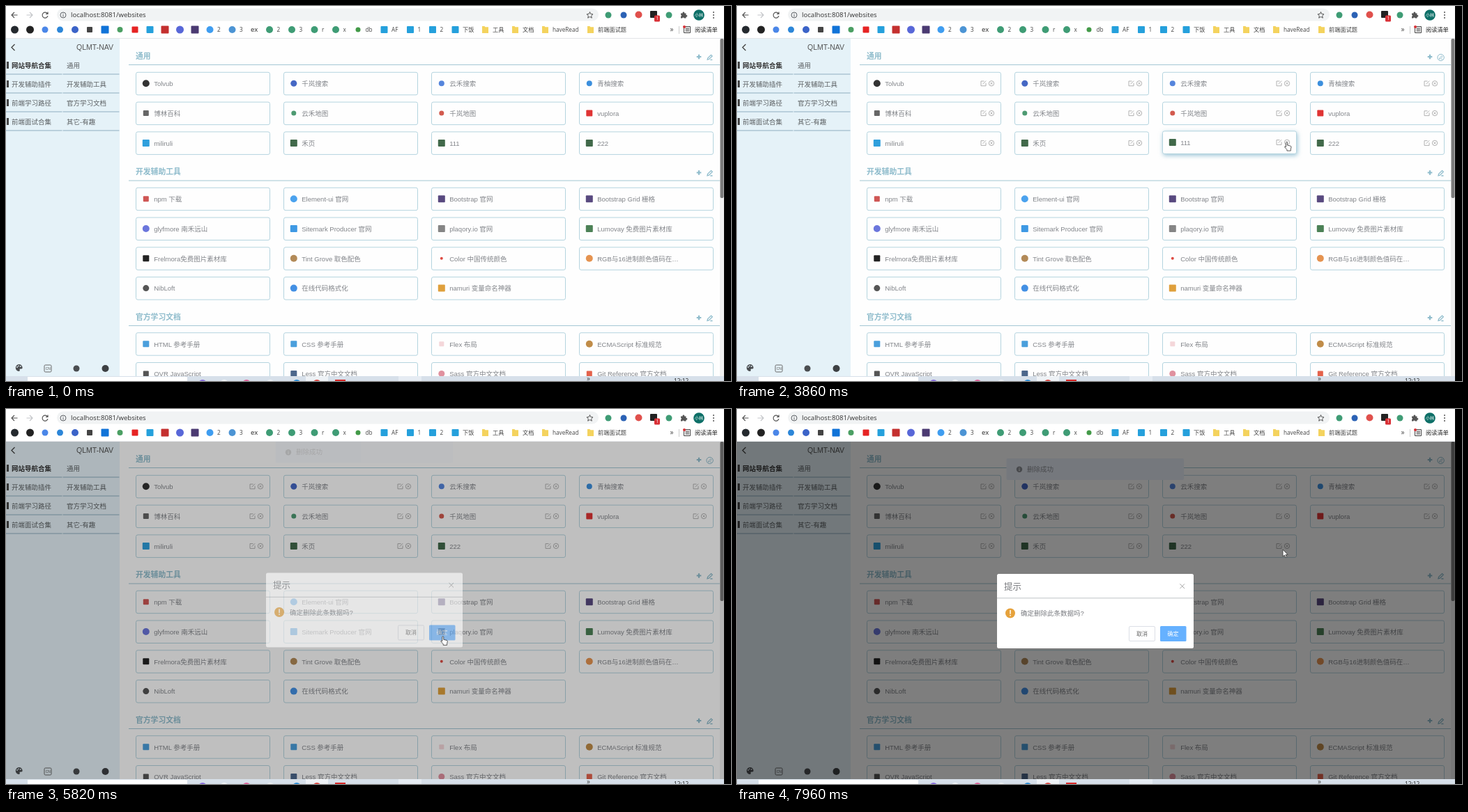
An HTML page that plays this animation: 1040 by 539 pixels, repeating every 8 s.

```html
<!DOCTYPE html>
<html lang="zh-CN">
<head>
<meta charset="utf-8">
<title>导航</title>
<style>
html, body { margin: 0; width: 100%; height: 100%; overflow: hidden; background: #fff; }
svg { display: block; width: 100%; height: 100%; }
text { font-family: "Liberation Sans", "Noto Sans CJK SC", "Noto Sans CJK", sans-serif; white-space: pre; }
.ui { font-family: "Open Sans", "Noto Sans CJK SC", "Noto Sans CJK", sans-serif; }
#page { clip-path: url(#viewport); }
</style>
</head>
<body>
<svg id="stage" viewBox="0 0 1040 539">
  <clipPath id="viewport"><rect y="47" width="1030" height="485"/></clipPath>
  <g id="chrome"></g>
  <g id="page">
    <g id="content"></g>
    <g id="cards"></g>
    <g id="message"></g>
    <rect id="overlay" y="47" width="1030" height="485"/>
    <g id="dialog"></g>
  </g>
  <g id="taskbar"></g>
  <g id="cursor">
    <circle id="halo" r="8" fill="#f3e54e" opacity=".8"/>
    <path id="hand" d="M-1 1a1 1 0 0 1 2 0V4.6l4.3 1q1.3.4 1.2 1.9L5.8 10.400V12.600H.4V11L-2.900 7.300q-.1-1.500 1.300-.8L-1 7z"/>
    <path id="arrow" d="M0 0V10L2.300 8 3.900 11.600 5.500 10.900 3.900 7.400H7.100Z"/>
  </g>
</svg>
<script>
const LOOP = 8000, EDIT_AT = 2400, DELETE_AT = 5750;
const COL = 212, CARD_W = 192, CARD_H = 32.5;
const $ = id => document.getElementById(id);
const add = (parent, ...parts) => parent.insertAdjacentHTML('beforeend', parts.join(''));

const text = (x, cy, s, size, fill, attrs = '') =>
  `<text x="${x}" y="${cy + size * .36}" font-size="${size}" fill="${fill}" ${attrs}>${s}</text>`;
const ui = (x, cy, s, size = 8.2, fill = '#444', attrs = '') => text(x, cy, s, size, fill, `class="ui" ${attrs}`);
const box = (x, y, w, h, fill, attrs = '') =>
  `<rect x="${x}" y="${y}" width="${w}" height="${h}" fill="${fill}" ${attrs}/>`;
const dot = (x, y, r, fill, attrs = '') => `<circle cx="${x}" cy="${y}" r="${r}" fill="${fill}" ${attrs}/>`;
const line = (x, y, d, color, width = 1, attrs = '') =>
  `<path transform="translate(${x} ${y})" d="${d}" fill="none" stroke="${color}" stroke-width="${width}" ${attrs}/>`;
// spec: shape letter, color and optional size, such as "c#333/7"
const mark = (x, y, spec) => {
  const [color, size = 10] = spec.slice(1).split('/');
  return spec[0] === 'c' ? dot(x, y, size / 2, color) : box(x - size / 2, y - size / 2, size, size, color, 'rx="1"');
};

function drawChrome() {
  add($('chrome'),
    box(0, 0, 1030, 47, '#fff'), box(0, 46, 1030, 1, '#e3e5e8'),
    box(73, 3.5, 777, 18, '#f1f3f4', 'rx="9"'),
    line(12, 13, 'M4.500 0H-4M0-4L-4 0L0 4', '#555', 1.2),
    line(34, 13, 'M-4.500 0H4M0-4L4 0L0 4', '#c4c6c9', 1.2),
    line(56, 13, 'M3.500-2A4 4 0 1 0 4 1.200M4-4.500V-1.500H1', '#555', 1.2),
    dot(82, 13, 4, 'none', 'stroke="#5f6368"'), line(82, 13, 'M0-2.300v1M0-.5v3', '#5f6368'),
    ui(93, 12.5, 'localhost:8081/websites', 9.65, '#333'),
    line(837.5, 13, 'M0-4.500L1.300-1.500 4.500-1.200 2.100 1 2.800 4.200 0 2.500-2.800 4.200-2.100 1-4.500-1.200-1.300-1.500Z', '#555'),
    mark(864, 13, 'c#3f9c75/9'), mark(886, 13, 'c#2b62b5/9'), mark(907.5, 12.5, 'c#e0504c'),
    mark(929, 12, 's#222'), box(930, 13.5, 8, 9, '#d93036', 'rx="1.5"'), ui(932.5, 18, '1', 6.5, '#fff'),
    mark(951, 13, 'c#3f9c75/9'),
    `<path transform="translate(972 13)" d="M-4-2.500H-1.500V-3a1.400 1.400 0 0 1 2.800 0V-2.500H3.500V0H4a1.300 1.300 0 0 1 0 2.700H3.500V4.500H.8a1.400 1.400 0 0 0-2.600 0H-4V2a1.300 1.300 0 0 0 0-2.500Z" fill="#555"/>`,
    dot(994, 13, 7.8, '#0d6f67'), ui(988, 12.8, '小林', 6, '#fff'),
    [9, 13, 17].map(y => dot(1015, y, 1, '#555')).join(''));

  const bookmarks = [
    [12.5, 'c#24292e/11'], [34.5, 'c#222/11'], [56, 'c#4a86e8/9'], [77.5, 'c#2c86d8/9'], [99, 'c#3b63c8'],
    [120, 's#444/8'], [142, 's#1073d8/11'], [163.5, 'c#4b9f63/8'], [185, 's#e62323/9'], [206.5, 's#25a0dc'],
    [228, 's#c4302f/11'], [249.5, 'c#5867d8/11'], [271, 's#4b3a72/11'], [292.5, 'c#3f9df0', '2'],
    [324.5, 'c#4c94d4', '3'], [378, 'c#3f9c75', '2'], [410, 'c#3f9c75', '3'], [442.5, 'c#3f9c75', 'r'],
    [473, 'c#3f9c75', 'x'], [505, 'c#439a48/7', 'db'], [542.5, 's#25a0dc', 'AF'], [580, 's#25a0dc', '1'],
    [612, 's#25a0dc', '2'], [644.5, 's#25a0dc', '下饭']];
  for (const [x, spec, label = ''] of bookmarks) add($('chrome'), mark(x, 34, spec), ui(x + 10.5, 34.5, label));
  const folders = [[687.5, '工具'], [730.5, '文档'], [773.5, 'haveRead'], [838.5, '前端面试题']];
  for (const [x, label] of folders)
    add($('chrome'), `<path transform="translate(${x} 34)" d="M-4.500-5H-1L0-3.800H4.500V5H-4.500Z" fill="#f4d35e"/>`,
      ui(x + 10.5, 34.5, label));
  add($('chrome'), ui(351, 34, 'ex', 9.5, '#222'), ui(952.5, 33.5, '»', 10),
    box(965, 29, 1, 11, '#ccc'), line(977, 34, 'M-4.500-4.500H4.500V4.500H-4.500ZM-2.500-2H3M-2.500 0H3M-2.500 2H3', '#444'),
    dot(973, 30, 2, '#d93036'), ui(988, 34.5, '阅读清单', 8.2, '#222'),
    box(1030, 0, 10, 539, '#000'));
}

const headerIcons = cy => line(994, cy + 1, 'M-3.300 0h6.600M0-3.300v6.600', '#8fbccc', 2.2);
const pencil = (x, y, scale, attrs = '') =>
  `<path transform="translate(${x} ${y}) scale(${scale})" d="M-3.500 3.500L-2.900 1.100 2-3.700 3.800-2-1.100 2.900ZM.8 3.700H4" fill="none" stroke="#8fbccc" stroke-width="1.300" ${attrs}/>`;

function drawContent() {
  const content = $('content');
  add(content, box(0, 47, 1030, 485, '#fefefe'), box(0, 47, 163, 485, '#e5f2f8'),
    line(10, 59.5, 'M2.500-4.500L-2 0L2.500 4.500', '#444', 1.3), text(101, 59.5, 'QLMT-NAV', 10.55, '#555'));
  const left = ['网站导航合集', '开发辅助插件', '前端学习路径', '前端面试合集'];
  const right = ['通用', '开发辅助工具', '官方学习文档', '其它-有趣'];
  left.forEach((label, i) => {
    const y = 85 + 27 * i;
    add(content, box(1, y - 5, 3, 10, '#444'),
      text(8, y + .5, label, 9.5, i ? '#5c6063' : '#333', i ? '' : 'font-weight="600"'),
      text(87, y + .5, right[i], 9.5, '#5c6063'),
      box(0, y + 12.5, 80.5, 1, '#8fb0c2'), box(81.5, y + 12.5, 81, 1, '#8fb0c2'));
  });
  add(content,
    `<path transform="translate(18.500 520)" d="M0-5A5 5 0 1 0 .5 5Q2 4 1 2.500 1 1.500 2.500 1.500H4Q5.500 1 5-1 4-5 0-5Z" fill="#4a4d50"/>`,
    dot(16, 519, .9, '#e5f2f8'), dot(18, 517.3, .9, '#e5f2f8'), dot(20.8, 518, .9, '#e5f2f8'),
    box(55, 516, 10, 10, 'none', 'rx="1.500" stroke="#666"'), text(56.7, 521, 'CN', 4.8, '#555'),
    mark(101, 521, 'c#4a4d50/9'), mark(142.5, 521, 'c#3d4043'),
    box(1024, 47, 6, 485, '#efefef'), box(1024.5, 47, 5, 229, '#7b7b7b', 'rx="2"'));

  [['通用', 72], ['开发辅助工具', 238.5], ['官方学习文档', 447]].forEach(([title, cy], i) => {
    add(content, text(186, cy, title, 10.8, '#8fbccc', 'font-weight="bold"'), headerIcons(cy),
      box(176, cy + 12, 848, 1, '#a3c7d4'), pencil(1009.5, cy + 1.8, i ? 1 : .95, i ? '' : 'id="pen"'));
  });
  add(content, `<g id="penActive">${dot(1009.6, 74, 4.7, 'none', 'stroke="#8fbccc"')}${pencil(1009.6, 74, .65)}</g>`);
}

const sections = [
  [95.3, [['Tolvub', 'c#333'], ['千岚搜索', 'c#4567c4/9'], ['云禾搜索', 'c#5585dc/8'], ['青柚搜索', 'c#3c8fdd/8'],
    ['博林百科', 's#666/8'], ['云禾地图', 'c#4d9a72/7'], ['千岚地图', 'c#d25a4e/7'], ['vuplora', 's#e03434/9'],
    ['miliruli', 's#2f9fdc'], ['禾页', 's#41694a'], ['111', 's#41694a'], ['222', 's#41694a']]],
  [261.2, [['npm 下载', 's#cf5654/8'], ['Element-ui 官网', 'c#4ba2ee'], ['Bootstrap 官网', 's#58497f'],
    ['Bootstrap Grid 栅格', 's#58497f'], ['glyfmore 南禾远山', 'c#6b76dc'], ['Sitemark Producer 官网', 's#3e99e4'],
    ['plaqory.io 官网', 's#858585'], ['Lumovay 免费图片素材库', 's#4c8156'], ['Frelmora免费图片素材库', 's#222/9'],
    ['Tint Grove 取色配色', 'c#b28a58'], ['Color 中国传统颜色', 'c#de4b43/4'], ['RGB与16进制颜色值码在…', 'c#e59350'],
    ['NibLoft', 'c#555/9'], ['在线代码格式化', 'c#4390e4'], ['namuri 变量命名神器', 's#dfa03c']]],
  [469.7, [['HTML 参考手册', 's#4a9fdc/9'], ['CSS 参考手册', 's#4a9fdc/9'], ['Flex 布局', 's#f4d7da/7'],
    ['ECMAScript 标准规范', 'c#c08c48'], ['QVR JavaScript', 's#555/8'], ['Less 官方中文文档', 's#4c678c/9'],
    ['Sass 官方中文文档', 'c#e0919f/9'], ['Git Reference 官方文档', 's#e4624b/8']]]
];
const cards = [];

function drawCards() {
  for (const [top, items] of sections) items.forEach(([label, spec], i) => {
    const x = 186.5 + COL * (i % 4), y = top + 42.8 * Math.floor(i / 4), cy = y + 16;
    const editable = top === 95.3;
    const actions = editable ? `<g class="actions">${
      line(x + 167, cy, 'M1-3.300H-3.500V3.500H3.500V-.5M-1 1L3.700-3.700', '#aaa', .9)}${
      line(x + 178.5, cy, 'M-3.700 0a3.700 3.700 0 1 0 7.400 0a3.700 3.700 0 1 0-7.400 0M-1.500-1.500l3 3M1.500-1.500l-3 3', '#aaa', .9)}</g>` : '';
    add($('cards'), `<g>${box(x, y, CARD_W, CARD_H, '#fefefe', 'rx="2.500" stroke="#b4d4df"')}${
      mark(x + 14.3, cy, spec)}${text(x + 25.7, cy + .4, label, 9.5, '#82858a')}${actions}</g>`);
    cards.push({ x, y, label, node: $('cards').lastElementChild });
  });
}

function drawPopups() {
  add($('message'), box(386.5, 71, 254.5, 31, '#ebf1fb', 'rx="2"'),
    dot(405, 86.8, 4.2, '#909399'), line(405, 86.8, 'M0-2.300v1.200M0-.3v2.600', '#fff'),
    text(416, 86.5, '删除成功', 9.5, '#909399'));
  add($('dialog'), box(373, 237, 282, 107, '#fff', 'rx="2.500"'),
    text(383, 255.5, '提示', 12.5, '#77797d', 'font-weight="500"'),
    line(638.7, 254.7, 'M-3.300-3.300l6.600 6.600M3.300-3.300l-6.600 6.600', '#999', .9),
    box(373, 271.3, 282, 1, '#bfc3c6'),
    dot(392, 293.5, 7, '#e6a23c'), box(391.3, 289, 1.5, 5.7, '#fff'), box(391.3, 296, 1.5, 1.6, '#fff'),
    text(407, 293.7, '确定删除此条数据吗?', 9.5, '#7b7d82'),
    box(562.5, 312.5, 37, 21, '#fff', 'rx="1.500" stroke="#dcdfe6"'), text(573, 323, '取消', 8, '#666'),
    box(607, 312, 37.5, 22, '#66b1ff', 'rx="1.500"'), text(617.5, 323, '确定', 8, '#fff', 'font-weight="500"'));
}

function drawTaskbar() {
  add($('taskbar'), box(0, 532, 1030, 7, '#d7e0ea'), box(31, 533, 229, 6, '#fff'), box(563, 532, 33, 7, '#e6ecf3'),
    box(430, 532, 32, 7, '#eef2f6'),
    [[282, '#8a6fe0'], [313, '#f4f7fa'], [345, '#e0639c'], [379, '#eef1f4'], [417, '#2b8fd8'], [446, '#dd4b45']]
      .map(([x, c]) => dot(x, 543, 6, c)).join(''),
    box(472, 537, 15, 2, '#d92b2b'), ui(833, 535, '»', 10, '#444'), ui(958, 539, '12:12', 8.3, '#222'));
}

const path = [
  [260, 1013, 530], [460, 1016, 420], [760, 1000, 230], [1060, 985, 116], [1130, 985, 116], [1740, 1005.5, 75],
  [2600, 1005.5, 75], [2900, 950, 150], [3200, 860, 196], [3390, 811, 201], [3450, 806, 200], [3860, 788.5, 195.5],
  [4940, 788.5, 195.5], [5340, 629, 325], [5550, 626.5, 327], [5820, 626.5, 327], [6310, 767.5, 223.5],
  [6440, 762, 200], [6700, 794, 197], [6900, 794, 197], [6970, 788.5, 195.5], [7700, 788.5, 195.5], [7960, 783, 202]
];
const ramp = (t, from, to) => Math.min(1, Math.max(0, (t - from) / (to - from)));
const modal = t => ramp(t, 4610, 4800) - ramp(t, 5750, 5890) + ramp(t, 7700, 7900);
const clicks = [[2330, 2460], [4540, 4680], [5690, 5760], [7630, 7760]];

function pointer(t) {
  const i = path.findIndex(key => key[0] > t);
  if (i < 0) return path[path.length - 1].slice(1);
  if (i === 0) return path[0].slice(1);
  const [t0, x0, y0] = path[i - 1], [t1, x1, y1] = path[i], k = (t - t0) / (t1 - t0);
  return [x0 + (x1 - x0) * k, y0 + (y1 - y0) * k];
}
const inside = ([px, py], x, y, w, h) => px >= x && px <= x + w && py >= y && py <= y + h;
const shiftOf = (card, t) => card.label === '222' && t >= DELETE_AT ? -COL : 0;
const hit = (card, t) => t >= 260 && modal(t) === 0 && !(card.label === '111' && t >= DELETE_AT) &&
  inside(pointer(t), card.x + shiftOf(card, t), card.y, CARD_W, CARD_H);

// Share of the last 160 ms spent over the card: a stateless hover transition.
function hoverAmount(card, t) {
  let hits = 0;
  for (let k = 0; k < 8; k++) hits += hit(card, t - k * 20);
  return hits / 8;
}

function render(t) {
  const editing = t >= EDIT_AT;
  for (const card of cards) {
    const h = hoverAmount(card, t);
    card.node.style.display = card.label === '111' && t >= DELETE_AT ? 'none' : '';
    card.node.setAttribute('transform', `translate(${shiftOf(card, t)} ${-h})`);
    card.node.style.filter = h ? `drop-shadow(1px 2px 3px rgba(90,160,190,${.6 * h}))` : '';
  }
  document.querySelectorAll('.actions').forEach(g => g.style.display = editing ? '' : 'none');
  $('pen').style.display = editing ? 'none' : '';
  $('penActive').style.display = editing ? '' : 'none';

  const m = modal(t), slide = ramp(t, 5750, 6090);
  $('overlay').setAttribute('opacity', m / 2);
  $('dialog').setAttribute('opacity', m ** .7);
  $('dialog').setAttribute('transform', `translate(0 ${-3 * (1 - m)})`);
  $('message').setAttribute('opacity', Math.min(1, slide * 1.5));
  $('message').setAttribute('transform', `translate(0 ${-31 * (1 - slide)})`);

  const p = pointer(t);
  const overButton = m > 0 && inside(p, 607, 312, 38, 22);
  const linkHand = overButton || inside(p, 1002, 68, 14, 12) || cards.some(card => hit(card, t));
  $('cursor').style.display = t < 260 ? 'none' : '';
  $('cursor').setAttribute('transform', `translate(${p})`);
  $('hand').style.display = linkHand ? '' : 'none';
  $('arrow').style.display = linkHand ? 'none' : '';
  $('halo').style.display = clicks.some(([from, to]) => t >= from && t < to) ? '' : 'none';
}

drawChrome();
drawContent();
drawCards();
drawPopups();
drawTaskbar();
for (const id of ['hand', 'arrow']) {
  $(id).setAttribute('fill', '#fff');
  $(id).setAttribute('stroke', '#333');
  $(id).setAttribute('stroke-width', '.8');
}
(function frame() {
  render(performance.now() % LOOP);
  requestAnimationFrame(frame);
})();
</script>
</body>
</html>
```
